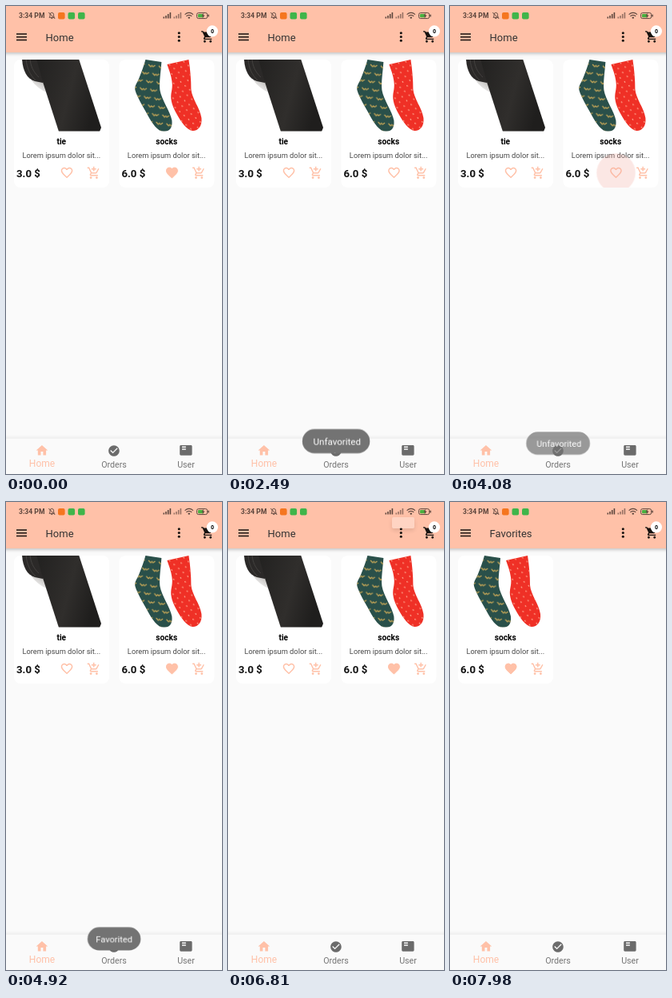
An HTML page that plays this animation: 270x585 px, repeating every 8 s.

```html
<!DOCTYPE html>
<html lang="en">
<head>
<meta charset="utf-8">
<title>Shop</title>
<style>
html, body { margin: 0; width: 100%; height: 100%; overflow: hidden; background: #fafafa; }
body { position: relative; font-family: Roboto, sans-serif; --peach: #ffc1a8; }
svg { position: absolute; left: 0; top: 0; display: block; }
.title { font-size: 13px; fill: #333; }
.name { font-size: 10.2px; font-weight: 700; text-anchor: middle; }
.desc { font-size: 9.3px; fill: #484848; text-anchor: middle; }
.price { font-size: 13.2px; font-weight: 700; fill: #111; }
.tab { font-size: 10.7px; fill: #757575; text-anchor: middle; }
.tab.on { font-size: 12px; fill: var(--peach); }
.peach { fill: var(--peach); }
.status { fill: #5c463d; }

.home { animation: home 8s step-end infinite; }
.favs { animation: favs 8s step-end infinite; }
.liked { animation: liked 8s step-end infinite; }
.ripple { opacity: 0; animation: ripple 8s linear infinite; }
.toast { opacity: 0; animation: toast 8s linear infinite; }
.toast.late { animation-delay: 2.315s; }
.toast rect { fill: #737373; }
.toast text { font-size: 11.3px; fill: #fff; text-anchor: middle; }

.menu { position: absolute; right: 37px; top: 19px; width: 77px; height: 77px; overflow: hidden;
  background: #fff; border-radius: 2px; opacity: 0;
  box-shadow: 0 3px 4px rgba(0,0,0,.22), 0 2px 8px rgba(0,0,0,.16);
  animation: menu 8s linear infinite; }
.list { position: absolute; right: 0; top: 6px; width: 77px; }
.item { height: 33px; line-height: 33px; padding-left: 11px; font-size: 11px; color: #333; }
.item span { display: inline-block; animation: item1 8s linear infinite; }
.item + .item span { animation-name: item2; }
.item:first-child { animation: press 8s linear infinite; }

@keyframes home { 0% { visibility: visible } 96.375%, 100% { visibility: hidden } }
@keyframes favs { 0% { visibility: hidden } 96.375%, 100% { visibility: visible } }
@keyframes liked { 0% { opacity: 1 } 28.125% { opacity: 0 } 54.75%, 100% { opacity: 1 } }
@keyframes ripple {
  0%, 12.5% { opacity: 0 } 13.25%, 13.875% { opacity: 1 } 14.6% { opacity: 0 }
  49.625% { opacity: 0 } 50.5%, 51.125% { opacity: 1 } 51.875%, 100% { opacity: 0 }
}
@keyframes toast {
  0%, 28.25% { opacity: 0; transform: translateY(9px) scale(.85) }
  29.625% { opacity: .85; transform: translateY(2px) scale(.97) }
  31.125%, 31.5% { opacity: 1; transform: translateY(-2px) scale(1.025) }
  32.625% { transform: translateY(.1px) scale(.98) }
  34.5%, 50.5625% { opacity: 1; transform: none }
  51.3125% { opacity: .54; transform: translateY(1px) scale(.945) }
  52.375%, 100% { opacity: 0; transform: translateY(1.5px) scale(.9) }
}
@keyframes menu {
  0%, 84.75% { opacity: 0; width: 0; height: 0 }
  85.825% { width: 77px }
  86% { opacity: 1 }
  86.8875% { height: 77px }
  98.325% { height: 77px }
  98.9125% { opacity: 1 }
  99.0375% { width: 77px }
  99.7%, 100% { opacity: 0; width: 0; height: 0 }
}
@keyframes item1 { 0%, 85.825% { opacity: 0 } 87.425%, 97.9625% { opacity: 1 } 99.0375%, 100% { opacity: 0 } }
@keyframes item2 { 0%, 86.8875% { opacity: 0 } 88.5%, 97.25% { opacity: 1 } 98.325%, 100% { opacity: 0 } }
@keyframes press { 0%, 95.7% { background: rgba(0,0,0,0) } 96% { background: rgba(0,0,0,.02) } 97.25%, 100% { background: rgba(0,0,0,.05) } }
</style>
</head>
<body>
<svg width="270" height="585" viewBox="0 0 270 585">
  <defs>
    <filter id="soft" x="-10%" y="-50%" width="120%" height="200%"><feGaussianBlur stdDeviation="2.2"/></filter>
    <clipPath id="card"><rect x="10" y="67" width="119" height="160" rx="8"/></clipPath>
    <clipPath id="photo"><rect x="10" y="67" width="119" height="89.5"/></clipPath>
    <linearGradient id="cloth" x2="1" y2=".3">
      <stop offset="0" stop-color="#222120"/><stop offset=".6" stop-color="#302e2c"/><stop offset="1" stop-color="#1f1e1d"/>
    </linearGradient>
    <linearGradient id="shade" x1="1" y1="0" x2=".3" y2="1">
      <stop offset="0" stop-color="#a9a6a3"/><stop offset="1" stop-color="#fff"/>
    </linearGradient>
    <pattern id="birds" width="13" height="20" patternUnits="userSpaceOnUse" patternTransform="translate(2 3) rotate(8)">
      <path d="M2 3l3 2.6L6.5 4 8 5.2 10.5 3M-4.5 13l3 2.6L0 14l1.5 1.2L4 13M8.5 13l3 2.6L13 14l1.5 1.2L17 13" fill="none" stroke="#c2a456" stroke-width="1.3"/>
    </pattern>
    <pattern id="dots" width="9" height="12" patternUnits="userSpaceOnUse" patternTransform="rotate(-12)">
      <path d="M2 2l.8 1.8M6.5 8l.8 1.8" stroke="#ffb49a" stroke-width="1.1"/>
    </pattern>

    <path id="heart" d="M16.5 3c-1.74 0-3.41.81-4.5 2.09C10.91 3.81 9.24 3 7.5 3 4.42 3 2 5.42 2 8.5c0 3.78 3.4 6.86 8.55 11.54L12 21.35l1.45-1.32C18.6 15.36 22 12.28 22 8.5 22 5.42 19.58 3 16.5 3z"/>
    <path id="heartline" d="M16.5 3c-1.74 0-3.41.81-4.5 2.09C10.91 3.81 9.24 3 7.5 3 4.42 3 2 5.42 2 8.5c0 3.78 3.4 6.86 8.55 11.54L12 21.35l1.45-1.32C18.6 15.36 22 12.28 22 8.5 22 5.42 19.58 3 16.5 3zm-4.4 15.55l-.1.1-.1-.1C7.14 14.24 4 11.39 4 8.5 4 6.5 5.5 5 7.5 5c1.54 0 3.04.99 3.57 2.36h1.87C13.46 5.99 14.96 5 16.5 5c2 0 3.5 1.5 3.5 3.5 0 2.89-3.14 5.74-7.9 10.05z"/>
    <path id="add" d="M11 9h2V6h3V4h-3V1h-2v3H8v2h3v3zm-4 9c-1.1 0-1.99.9-1.99 2S5.9 22 7 22s2-.9 2-2-.9-2-2-2zm10 0c-1.1 0-1.99.9-1.99 2s.89 2 1.99 2 2-.9 2-2-.9-2-2-2zm-9.83-3.25l.03-.12.9-1.63h7.45c.75 0 1.41-.41 1.75-1.03l3.86-7.01L19.42 4h-.01l-1.1 2-2.76 5H8.53l-.13-.27L6.16 6l-.95-2-.94-2H1v2h2l3.6 7.59-1.35 2.45c-.16.28-.25.61-.25.96 0 1.1.9 2 2 2h12v-2H7.42c-.13 0-.25-.11-.25-.25z"/>
    <path id="cart" d="M7 18c-1.1 0-1.99.9-1.99 2S5.9 22 7 22s2-.9 2-2-.9-2-2-2zM1 2v2h2l3.6 7.59-1.35 2.45c-.16.28-.25.61-.25.96 0 1.1.9 2 2 2h12v-2H7.42c-.14 0-.25-.11-.25-.25l.03-.12.9-1.63h7.45c.75 0 1.41-.41 1.75-1.03l3.58-6.49c.08-.14.12-.31.12-.48 0-.55-.45-1-1-1H5.21l-.94-2H1zm16 16c-1.1 0-1.99.9-1.99 2s.89 2 1.99 2 2-.9 2-2-.9-2-2-2z"/>

    <g id="tie" clip-path="url(#photo)">
      <path d="M31 92Q40 104 51 108L45 90z" fill="url(#shade)"/>
      <path d="M20 66C21 81 26 91 36 94L46 96 50 66z" fill="#2b2928"/>
      <path d="M25 66c1 12 5 20 12 27M30 66c1 10 4 16 11 23" fill="none" stroke="#4b4846" stroke-width=".8"/>
      <path d="M38 66H91L119 152 117 157H66L46 95z" fill="url(#cloth)"/>
    </g>
    <path id="green" d="M43 67L63 70C62 84 60 94 61 105 63 117 74 132 76 143 77 152 73 157 66 157 58 157 51 146 46 137 40 126 32 113 30 105 29 99 33 96 35 90 38 82 41 75 43 67z"/>
    <path id="red" d="M70 73L97 67C99 80 100 92 100 104 101 116 111 127 113 140 114 150 109 156 102 156 94 155 87 144 82 135 77 126 74 118 75 110 76 104 77 100 76 94 75 86 72 79 70 73z"/>
    <g id="socks" clip-path="url(#photo)">
      <use href="#green" fill="#2a504a"/><use href="#green" fill="url(#birds)"/>
      <use href="#red" fill="#ef3026"/><use href="#red" fill="url(#dots)"/>
    </g>
    <g id="base">
      <rect x="10" y="67" width="119" height="160" rx="8" fill="#fff"/>
      <text class="desc" x="69.3" y="190">Lorem ipsum dolor sit...</text>
      <use class="peach" href="#heartline" transform="translate(67.3 199.6) scale(.73)"/>
      <use class="peach" href="#add" transform="translate(101 200) scale(.73)"/>
    </g>
    <g id="sockcard">
      <use href="#base"/><use href="#socks"/>
      <text class="name" x="69.3" y="172.5">socks</text>
      <text class="price" x="13" y="213.7">6.0 $</text>
    </g>
    <path id="bars" d="M0 13.6h1.6v1.9H0zM2.7 11.9h1.6v3.6H2.7zM5.4 10h1.6v5.5H5.4zM8.1 8h1.6v7.5H8.1z"/>
  </defs>

  <rect width="270" height="585" fill="#fafafa"/>

  <g class="home">
    <use href="#base"/><use href="#tie"/>
    <text class="name" x="69.3" y="172.5">tie</text>
    <text class="price" x="13" y="213.7">3.0 $</text>
    <g transform="translate(131.4)">
      <use href="#sockcard"/>
      <use class="peach liked" href="#heart" transform="translate(67.3 199.6) scale(.73)"/>
      <g clip-path="url(#card)"><circle class="ripple" cx="76.1" cy="208.5" r="24.3" fill="#f0a79b" fill-opacity=".27"/></g>
    </g>
  </g>
  <g class="favs">
    <use href="#sockcard"/>
    <use class="peach" href="#heart" transform="translate(67.3 199.6) scale(.73)"/>
  </g>

  <rect x="-6" y="2" width="282" height="57.5" opacity=".24" filter="url(#soft)"/>
  <rect class="peach" width="270" height="58"/>

  <g class="status">
    <text x="16" y="15.3" font-size="8.6" font-weight="700">3:34 PM</text>
    <path d="M54 14.3h6.6l-1-1.4v-2.2q0-2.2-2.3-2.4-2.3.2-2.3 2.4v2.2zM56.3 15h2q-1 1.4-2 0z" fill="none" stroke="#5c463d" stroke-width=".9"/>
    <path d="M53.3 8l8 8" stroke="#5c463d"/>
    <rect x="65" y="8" width="8.6" height="8.4" rx="2" fill="#f5761f"/>
    <rect x="77.5" y="8" width="8.6" height="8.4" rx="2" fill="#3fb54a"/>
    <rect x="90" y="8" width="8.6" height="8.4" rx="2" fill="#3fb54a"/>
    <use href="#bars" x="196.5"/><use href="#bars" x="209.5" opacity=".65"/>
    <g fill="none" stroke="#5c463d" stroke-width="1.2">
      <path d="M223.6 10.6q5.2-4.4 10.4 0M225.4 12.7q3.4-2.8 6.8 0"/>
      <rect x="238.6" y="8.6" width="13" height="7" rx="2" stroke-width="1"/>
    </g>
    <circle cx="228.8" cy="14.6" r="1.2"/>
    <rect x="252.4" y="10.6" width="1.4" height="3" rx=".6"/>
    <rect x="240" y="10" width="6.5" height="4.2" rx=".8" fill="#48b040"/>
    <path d="M247 8.8l-2.6 3.8h1.8l-.6 3 3-4.2h-2z"/>
  </g>

  <path d="M13 34.3h13v1.5H13zM13 38h13v1.5H13zM13 41.7h13v1.5H13z" fill="#17120f"/>
  <g class="home"><text class="title" x="49.6" y="43.7">Home</text></g>
  <g class="favs"><text class="title" x="49.6" y="43.7">Favorites</text></g>
  <g fill="#17120f">
    <circle cx="216.3" cy="33.8" r="1.55"/><circle cx="216.3" cy="38.5" r="1.55"/><circle cx="216.3" cy="43.2" r="1.55"/>
    <use href="#cart" transform="translate(243.3 29.7) scale(.73)"/>
  </g>
  <circle cx="257.9" cy="31.4" r="7.1" fill="#fff"/>
  <text x="257.9" y="34" font-size="7" font-weight="700" text-anchor="middle">0</text>

  <rect x="-6" y="540" width="282" height="52" opacity=".09" filter="url(#soft)"/>
  <rect y="540.5" width="270" height="45" fill="#fafafa"/>
  <path class="peach" d="M10 20v-6h4v6h5v-8h3L12 3 2 12h3v8z" transform="translate(36.2 546.8) scale(.73)"/>
  <g fill="#6b6b6b">
    <path d="M12 2C6.48 2 2 6.48 2 12s4.48 10 10 10 10-4.48 10-10S17.52 2 12 2zm-2 15l-5-5 1.41-1.41L10 14.17l7.59-7.59L19 8l-9 9z" transform="translate(126.8 547.8) scale(.68)"/>
    <path d="M21 3H3c-1.1 0-2 .9-2 2v14c0 1.1.9 2 2 2h18c1.1 0 2-.9 2-2V5c0-1.1-.9-2-2-2zm-9 8H5V9h7v2zm0-4H5V5h7v2z" transform="translate(216.5 547) scale(.7)"/>
  </g>
  <text class="tab on" x="45" y="576.3">Home</text>
  <text class="tab" x="135" y="576.5">Orders</text>
  <text class="tab" x="225" y="576.5">User</text>

  <g transform="translate(135.1 546)">
    <g class="toast">
      <rect x="-41.2" y="-14.8" width="82.4" height="29.6" rx="14.8"/>
      <text x="1.2" y="4.3">Unfavorited</text>
    </g>
    <g class="toast late">
      <rect x="-33.8" y="-14.8" width="67.6" height="29.6" rx="14.8"/>
      <text y="4.3">Favorited</text>
    </g>
  </g>
</svg>
<div class="menu"><div class="list">
  <div class="item"><span>Favorites</span></div>
  <div class="item"><span>All</span></div>
</div></div>
</body>
</html>
```
